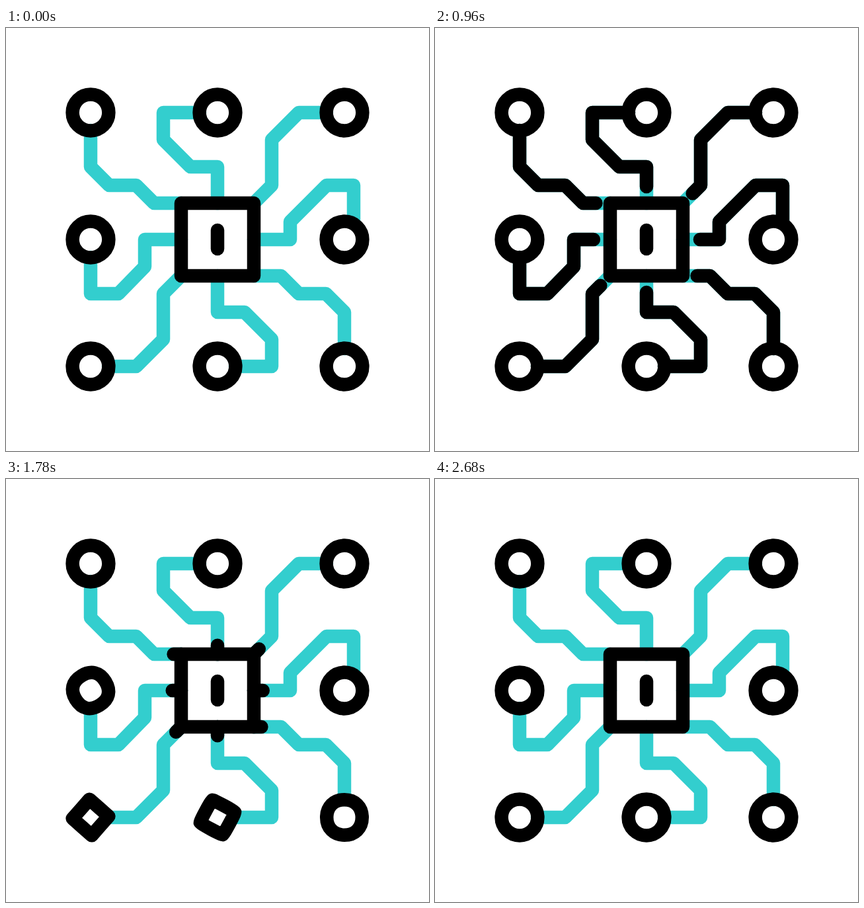
These frames come from a looping animation (640 px wide and 640 px high, 3.02 s). An HTML page:

```html
<!DOCTYPE html>
<html lang="en">
<head>
<meta charset="utf-8">
<title>Circuit chip</title>
<style>
  html, body { margin: 0; width: 100%; height: 100%; overflow: hidden; background: #fff; }
  svg { display: block; width: 100%; height: 100%; }
  path { fill: none; stroke: #000; stroke-width: 20.5; stroke-linecap: round; stroke-linejoin: round; }
  .wire { stroke: #33cece; }
</style>
</head>
<body>
<svg viewBox="0 0 640 640"></svg>
<script>
const LOOP = 3020;
const RADIUS = 27.4;
const FILL_START = 340, DRAIN_START = 1010, TRIM_TIME = 1200;
const MORPH_START = 1270, MORPH_STEP = 126, MORPH_TIME = 524;

// Counter-clockwise from top left: node centre, then its wire from node to chip.
const links = [
  [128, 128, 'M128 155V210L156 238H197L224 265H265'],
  [128, 320, 'M128 347V402H170L210 361V320H265'],
  [128, 512, 'M155 512H197L238 471V402L265 375'],
  [320, 512, 'M347 512H402V471L361 430H320V375'],
  [512, 512, 'M512 485V430L484 402H443L416 375H375'],
  [512, 320, 'M526 296V238H485L430 293V320H375'],
  [512, 128, 'M485 128H443L402 169V238L375 265'],
  [320, 128, 'M293 128H238V169L279 210H320V265']
];

const svg = document.querySelector('svg');
function addPath(d, className = '') {
  const path = document.createElementNS('http://www.w3.org/2000/svg', 'path');
  path.setAttribute('d', d);
  path.setAttribute('class', className);
  svg.append(path);
  return path;
}

links.forEach(([, , d]) => addPath(d, 'wire'));
const pulses = links.map(([, , d]) => {
  const path = addPath(d);
  path.setAttribute('pathLength', 1);
  return path;
});
const nodes = links.map(() => addPath(''));
addPath('M265 265H375V375H265Z');
addPath('M320 306V334');

const clamp = x => Math.min(1, Math.max(0, x));
const expoOut = x => (1 - Math.exp(-4.2 * clamp(x))) / (1 - Math.exp(-4.2));
const cubicOut = x => 1 - (1 - clamp(x)) ** 3;
const spin = x => 0.5 + Math.sign(x - 0.5) * (1 - Math.abs(2 * x - 1) === 0 ? 0.5 : 0.5 - 0.5 * (1 - Math.abs(2 * x - 1)) ** 2.3);

// Four anchors on a circle; shrinking the handles turns it into a square.
function nodeShape(squareness) {
  const handle = 0.5523 * (1 - squareness);
  const point = (angle, along) => {
    const c = Math.cos(angle), s = Math.sin(angle);
    return `${RADIUS * (c - along * s)} ${RADIUS * (s + along * c)} `;
  };
  let d = 'M' + point(Math.PI / 4, 0);
  for (let i = 0; i < 4; i++) {
    const from = Math.PI / 4 + i * Math.PI / 2, to = from + Math.PI / 2;
    d += 'C' + point(from, handle) + point(to, -handle) + point(to, 0);
  }
  return d + 'Z';
}

function draw(now) {
  const t = now % LOOP;
  const head = expoOut((t - FILL_START) / TRIM_TIME);
  const tail = expoOut((t - DRAIN_START) / TRIM_TIME);

  links.forEach(([x, y], i) => {
    const pulse = pulses[i].style;
    pulse.visibility = head > tail ? 'visible' : 'hidden';
    pulse.strokeDasharray = `${head - tail} 3`;
    pulse.strokeDashoffset = -tail;

    const p = clamp((t - MORPH_START - i * MORPH_STEP) / MORPH_TIME);
    const squareness = p < 0.5 ? cubicOut(2 * p) : 1 - cubicOut(2 * p - 1);
    nodes[i].setAttribute('d', nodeShape(squareness));
    nodes[i].setAttribute('transform', `translate(${x} ${y}) rotate(${270 * spin(p)})`);
  });
  requestAnimationFrame(draw);
}
draw(0);
</script>
</body>
</html>
```
